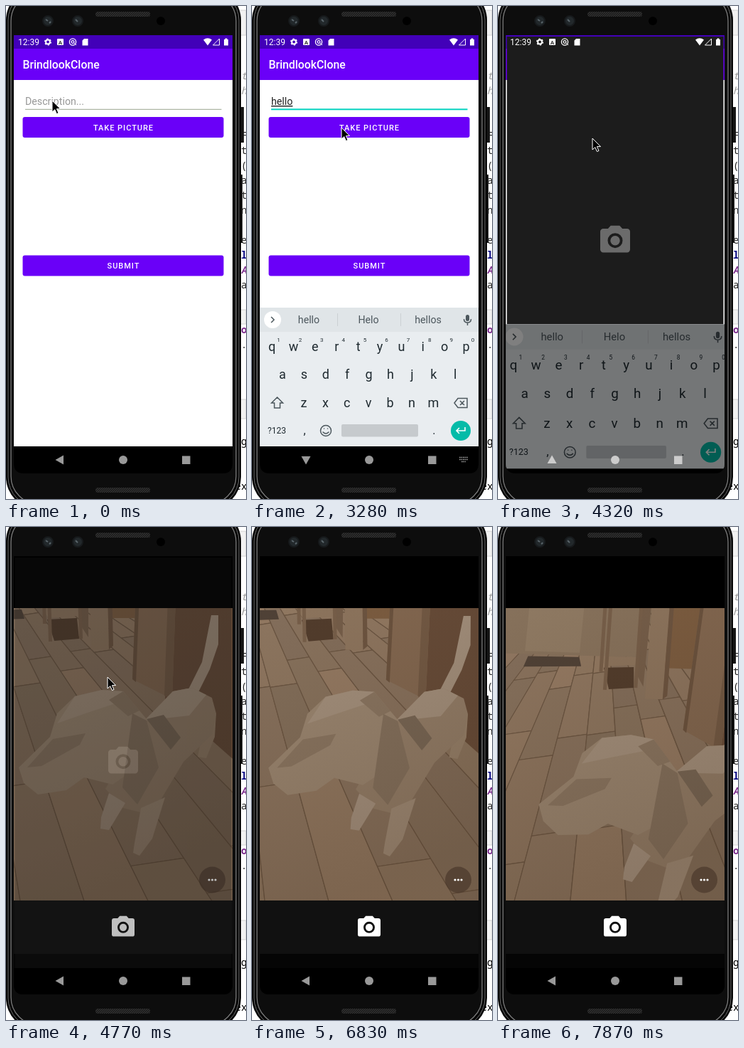
These frames come from a looping animation (338 px wide and 693 px high, 8 s). An HTML page:

```html
<!DOCTYPE html>
<html lang="en">
<head>
<meta charset="utf-8">
<title>Phone demo</title>
<style>
html, body { margin: 0; width: 100%; height: 100%; overflow: hidden; background: #fff; }
svg { display: block; width: 338px; height: 693px; font-family: Roboto, sans-serif; }
.mid { text-anchor: middle; }
.btn { font-size: 11px; font-weight: 500; letter-spacing: .98px; fill: #fff; text-anchor: middle; }
.line { fill: none; stroke: #4c575d; stroke-width: 1.5; }
#code { font: 14px "Noto Sans Mono", monospace; }
</style>
</head>
<body>
<svg viewBox="0 0 338 693">
  <defs>
    <clipPath id="screen"><path d="M11 41H319V643Q319 657 305 657H25Q11 657 11 643Z"/></clipPath>
    <clipPath id="keyClip"><rect id="keyArea" x="11" y="41" width="308" height="578"/></clipPath>
    <clipPath id="lens"><rect x="11" y="114" width="308" height="411"/></clipPath>
    <pattern id="mesh" width="3" height="3" patternUnits="userSpaceOnUse">
      <rect width="3" height="3" fill="#1b1b1b"/><path d="M0 3L3 0" stroke="#3a3a3a"/>
    </pattern>
    <linearGradient id="shade" x2=".3" y2="1">
      <stop offset="0" stop-color="#35210f" stop-opacity="0"/>
      <stop offset="1" stop-color="#35210f" stop-opacity=".22"/>
    </linearGradient>
    <g id="cam">
      <path d="M9 2 7.17 4H4a2 2 0 0 0-2 2v12a2 2 0 0 0 2 2h16a2 2 0 0 0 2-2V6a2 2 0 0 0-2-2h-3.17L15 2zm3 15a5 5 0 1 1 0-10 5 5 0 0 1 0 10z"/>
      <circle cx="12" cy="12" r="3.2"/>
    </g>
  </defs>

  <!-- editor behind the phone -->
  <rect width="338" height="693" fill="#fff"/>
  <path d="M320 6h18v35h-18zM320 427h18v20h-18zM320 553h18v27h-18z" fill="#f2f2f2" stroke="#d4d4d4"/>
  <g id="code"><text x="331" y="617">g</text><text x="322.5" y="680">ex</text></g>

  <!-- phone -->
  <path d="M328 142h7v50h-7zM328 237h5v96h-5z" fill="#161616"/>
  <rect y="-25" width="331" height="732" rx="45" fill="#050505"/>
  <rect x="3" y="-22" width="325" height="726" rx="42" fill="none" stroke="#6a6a6a"/>
  <rect x="7" y="-18" width="317" height="718" rx="39" fill="#0d0d0d" stroke="#7c7c7c" stroke-width="1.3"/>
  <rect x="126" y="8" width="77" height="7" rx="3" fill="url(#mesh)"/>
  <rect x="126" y="677" width="77" height="7" rx="3" fill="url(#mesh)"/>
  <g fill="#22282b" stroke="#171a1c" stroke-width="2">
    <circle cx="59" cy="21" r="7"/><circle cx="101" cy="21" r="7"/>
  </g>
  <path d="M56 19l3 2M61 24l2-2M98 19l3 3" stroke="#59646a" stroke-width="2"/>
  <circle cx="218" cy="21" r="6" fill="#000"/>

  <g clip-path="url(#screen)">
    <rect x="11" y="41" width="308" height="616" fill="#000"/>

    <g id="app">
      <rect x="11" y="41" width="308" height="578" fill="#fff"/>
      <rect x="11" y="41" width="308" height="19" fill="#4200b8"/>
      <rect x="11" y="60" width="308" height="44" fill="#6a00f8"/>
      <text x="23.5" y="88" font-size="15.8" font-weight="500" fill="#fff">BrindlookClone</text>
      <text id="hint" x="27" y="139" font-size="14.2" fill="#989898">Description...</text>
      <text id="typed" x="27" y="139" font-size="14.2" fill="#222" text-decoration="underline"></text>
      <rect id="rule" x="27" width="276.5"/>
      <rect id="caret" y="125" width="1.6" height="18" fill="#03cdb9"/>
      <rect id="take" x="23.5" y="156" width="283" height="29" rx="3"/>
      <text class="btn" x="165.5" y="175">TAKE PICTURE</text>
      <rect x="23.5" y="350.5" width="283" height="29" rx="3" fill="#6a00f8"/>
      <text class="btn" x="165.5" y="369">SUBMIT</text>
    </g>

    <g id="camera">
      <rect x="11" y="41" width="308" height="616" fill="#000"/>
      <rect x="11" y="525" width="308" height="75" fill="#111"/>
      <rect x="11" y="600" width="308" height="20" fill="#050505"/>
      <g clip-path="url(#lens)">
        <g id="floor"></g>
        <g id="room"></g>
        <g id="dog"></g>
        <rect x="11" y="114" width="308" height="411" fill="url(#shade)"/>
      </g>
      <circle cx="290.5" cy="496" r="18.5" fill="#4a382b" fill-opacity=".7"/>
      <path d="M286 496h.01M290.5 496h.01M295 496h.01" stroke="#fff" stroke-width="3.2" stroke-linecap="round"/>
      <use href="#cam" fill="#fff" transform="translate(145.8 543.6) scale(1.6)"/>
    </g>

    <g id="splash">
      <rect x="12.5" y="43" width="305" height="577" fill="#1c1c1c"/>
      <use href="#cam" fill="#6b6b6b" transform="translate(139.8 304.5) scale(2.1)"/>
    </g>

    <g clip-path="url(#keyClip)">
      <g id="keyboard">
        <rect x="11" y="424" width="308" height="195" fill="#e9edf0"/>
        <rect x="11" y="424" width="308" height="34" fill="#e0e5e8"/>
        <circle cx="29" cy="441" r="12" fill="#fff"/>
        <path id="chevron" class="line"/>
        <g id="tools">
          <path class="line" d="M72 443l5 5M74 439.5a4.5 4.5 0 1 1-9 0 4.500 4.500 0 1 1 9 0M110 435h10v8l-4 4h-6zM112 440q3 4 6 0"/>
          <text class="mid" x="159" y="445" font-size="11" font-weight="700" fill="#4c575d">GIF</text>
          <rect x="199" y="435" width="12" height="12" fill="#5b666c"/>
          <path d="M232.5 433v16" stroke="#cbd0d3"/>
          <path d="M255 441h.01M260 441h.01M265 441h.01" stroke="#4c575d" stroke-width="3" stroke-linecap="round"/>
        </g>
        <g id="words" font-size="14.2" fill="#4c575d" class="mid">
          <path d="M120.5 432v18M209.5 432v18" stroke="#cbd0d3"/>
          <text x="80" y="446"></text><text x="164" y="446"></text><text x="248" y="446"></text>
        </g>
        <rect x="301" y="434" width="5" height="9" rx="2.5" fill="#4c575d"/>
        <path class="line" d="M298.5 440q0 5 5 5t5-5M303.5 445v4"/>
        <g id="keys" class="mid" fill="#1f2a30"></g>
        <path class="line" d="M35.5 550l8 8h-4v7h-8v-7h-4zM285 558l5-6.5h13v13h-13zM293 555l6 6M299 555l-6 6"/>
        <circle class="line" cx="104" cy="597" r="7.5"/>
        <path class="line" d="M100 599q4 4 8 0M101.5 594h.01M106.5 594h.01" stroke-linecap="round"/>
        <rect x="126" y="588" width="108" height="17.5" rx="2" fill="#c6cacd"/>
        <circle cx="294" cy="597" r="14" fill="#04bba8"/>
        <path d="M300 592v5h-12M292 593l-4 4 4 4" fill="none" stroke="#fff" stroke-width="1.6"/>
        <rect id="dim" x="11" y="424" width="308" height="195"/>
      </g>
    </g>

    <g id="status" fill="#fff">
      <text x="17" y="55" font-size="12">12:39</text>
      <circle cx="59" cy="50.5" r="2.9" fill="none" stroke="#fff" stroke-width="2"/>
      <circle cx="59" cy="50.5" r="4.3" fill="none" stroke="#fff" stroke-width="1.5" stroke-dasharray="2.25"/>
      <rect x="72" y="46" width="9" height="9" rx="1"/>
      <text class="mid" x="76.5" y="53.5" font-size="8" font-weight="700" fill="#333">A</text>
      <circle cx="94" cy="50.5" r="4.6" fill="none" stroke="#fff" stroke-width="1.3"/>
      <circle cx="94" cy="50.5" r="1.9" fill="none" stroke="#fff" stroke-width="1.2"/>
      <path d="M96 52l3 3" stroke="#fff"/>
      <path d="M110 46h5.5v9.5h-8v-7zM284 55.5l-6-8q6-4.5 12 0zM307 47h1.5v-1.5h3v1.5h1.5v8.5h-6z"/>
      <path d="M300.5 46v9h-9z" fill="none" stroke="#fff"/>
    </g>

    <g id="nav">
      <path id="back" d="M69.5 638l11.5-6.5v13z"/>
      <circle cx="165" cy="638" r="6"/>
      <rect x="248" y="632.5" width="11.5" height="11.5"/>
      <path id="imeIcon" d="M292 634.5h12M292 637.5h12M295 640.5h6" stroke="#999" stroke-width="1.7" stroke-dasharray="1.7 .8"/>
    </g>
  </g>
  <path id="cursor" d="M0 0V16l3.8-3.4 2.6 6 2.6-1.1-2.6-5.9H11.5z" fill="#000" stroke="#fff"/>
</svg>

<script>
const $ = id => document.getElementById(id);
const set = (id, attrs) => { for (const k in attrs) $(id).setAttribute(k, attrs[k]); };
const show = (id, on) => $(id).style.display = on ? "" : "none";
const mix = (a, b, k) => a + (b - a) * k;
const add = (id, html) => $(id).insertAdjacentHTML("beforeend", html);
const poly = (id, fill, points, extra = "") =>
  add(id, `<polygon fill="${fill}" points="${points}" ${extra}/>`);

// Editor text peeking out at the right, one character per line
const ink = c => c === "l" ? "#000080" : /[Ao]/.test(c) ? "#7b2a8c" : "#222";
[..."th  Ft(atn elAa  o."].forEach((c, i) => add("code",
  `<text x="331" y="${103 + 21 * i}" fill="${i < 2 ? "#999" : ink(c)}"
    font-weight="${/[lAo]/.test(c) ? 700 : 400}" font-style="${i < 2 || /A/.test(c) ? "italic" : "normal"}">${c}</text>`));

// Keys
const row = (chars, x, y, size = 18) => [...chars].forEach((c, i) =>
  add("keys", `<text x="${x + 30.4 * i}" y="${y}" font-size="${size}">${c}</text>`));
row("qwertyuiop", 28, 485);
row("1234567890", 37.5, 472, 8);
row("asdfghjkl", 43, 524);
row("zxcvbnm", 73, 564);
row(",     .", 74, 602, 16);
add("keys", '<text x="35" y="601" font-size="12">?123</text>');

// Floor boards fan out from a vanishing point, with slightly tilted joints
const rand = n => { const s = Math.sin(n * 127.1) * 43758.5; return s - Math.floor(s); };
const onRay = (i, d) => {
  const s = i * .165, k = d / (1 + .15 * s);
  return [-70 + s * k, -20 + k].map(v => v.toFixed(1));
};
poly("floor", "#84705a", "-400,-100 700,-100 700,800 -400,800");
for (let i = -11; i < 22; i++) {
  for (let j = 0; j < 6; j++) {
    const near = 75 * 1.55 ** (j + rand(i + 40)), far = near * 1.55, v = rand(i * 9 + j + 200);
    poly("floor", `hsl(29 ${18 + v * 2}% ${43 + v * 5}%)`,
      [onRay(i, near), onRay(i + 1, near), onRay(i + 1, far), onRay(i, far)].join(" "),
      'stroke="#6a5542" stroke-width="1.2"');
  }
}

// Upright slab reaching out of view at the top
const post = (fill, x, w, foot, lean = 0, drop = 0) =>
  poly("room", fill, [x, -40, x + w, -40, x + w + lean, foot + drop, x + lean, foot]);
post("#86715b", -200, 316, 114);
post("#8e7962", -55, 77, 110);
poly("room", "#4f4136", "-50,117 22,116 26,129 -55,132");
post("#7b5c40", 143, 48, 128);
post("#745d49", 103, 13, 135, 0, 20);
poly("room", "#513c2c", "58,130 100,128 103,157 68,160");
post("#8c745d", 115, 25, 172, 5);
post("#6c5440", 140, 6, 172, 5, -5);
poly("room", "#8c745d", "50,114 101,114 104,125 60,128");
for (const [x, foot] of [[46, 136], [54, 161], [97, 157]]) post("#765e49", x, 5, foot, 6);
poly("room", "#664b38", "240,-40 460,-40 460,450 224,242");
post("#826750", 188, 56, 214, -10, 28);
post("#6a523e", 188, 5, 214, -10, 4);
post("#725944", 233, 11, 237, -10, 5);

const fur = (tone, points) => poly("dog", `hsl(30 17% ${tone}%)`, points);
fur(56, "289,124 299,124 299,165 287,200 270,234 256,230 276,190");
fur(50, "284,262 296,262 294,295 282,325 270,323 275,298");
fur(49, "195,272 235,231 262,226 290,240 296,262 290,292 250,330 205,405 165,395 140,368");
fur(56, "195,272 235,231 262,226 282,236 258,265");
fur(54, "190,395 224,380 206,438 188,462 179,458 181,444");
fur(57, "145,374 168,388 145,426 133,424 134,408");
fur(52, "18,338 62,295 72,262 97,238 135,229 165,231 198,270 175,345 150,362 110,352 85,370 45,376 25,360");
fur(56, "97,238 135,229 165,231 172,242 112,262 72,276");
fur(46, "30,338 66,298 112,290 104,306 50,336");
fur(46, "145,243 165,231 188,258 172,266");
fur(44, "178,262 198,272 215,338 185,390 164,366");
fur(40, "198,270 222,264 246,296 232,313");

// Pointer stops: step, x, y
const stops = [[1, 65, 133], [7, 97, 131], [19, 97, 131], [22, 126, 171], [26, 133, 186], [29, 133, 186],
  [32, 143, 211], [34, 143, 211], [37, 143, 242], [41, 121, 244], [54, 121, 244]];
function pointer(n) {
  const i = Math.max(1, stops.findIndex(s => s[0] >= n));
  const [a, x, y] = stops[i - 1], [b, u, v] = stops[i];
  const k = Math.max(0, (n - a) / (b - a));
  return [mix(x, u, k), mix(y, v, k)];
}

const typing = ["", "h", "he", "hell", "hello"];
const guesses = ["", "hi how he", "he hey her", "hell hello help", "hello Helo hellos"];

// Affine move from rest to m; sideways and vertical parts ease differently
const pan = (id, [a, b, c, d, e, f], kx, ky) => set(id, {
  transform: `matrix(${mix(1, a, kx)} ${b * ky} ${c * kx} ${mix(1, d, ky)} ${e * kx} ${f * ky})`
});

function draw(n) {
  const focus = n >= 3, opening = n >= 26, zoomed = n >= 29, live = n >= 31;
  const typed = Math.min(4, Math.max(0, n - 14));

  $("typed").textContent = typing[typed];
  show("hint", !typed);
  set("rule", focus ? { y: 144.3, height: 2, fill: "#06d3c0" } : { y: 144.8, height: 1, fill: "#9aa68f" });
  show("caret", (n >= 10 && n < 13) || (n >= 15 && n < 20));
  set("caret", { x: 27 + (typed ? $("typed").getComputedTextLength() + .5 : 0) });
  set("take", { fill: n === 24 || n === 25 ? "#8a3cfa" : "#6a00f8" });

  show("tools", !typed);
  show("words", typed);
  set("chevron", { d: typed ? "M27 437l4 4-4 4" : "M31 437l-4 4 4 4" });
  const guess = guesses[typed].split(" ");
  document.querySelectorAll("#words text").forEach((el, i) => el.textContent = guess[i] || "");

  const grow = zoomed ? 1 : opening ? .5 : 0;
  const slide = 30 * Math.max(0, 7 - n) ** 2;
  show("keyboard", n >= 5 && !live);
  set("keyArea", { height: opening ? 616 : 578 });
  set("keyboard", { transform: `matrix(${1 + .044 * grow} 0 0 ${1 + .04 * grow} ${-7.3 * grow} ${6.4 * grow + slide})` });
  set("dim", { opacity: .5 * grow });

  show("app", !live);
  show("status", !live);
  show("camera", live);
  set("splash", { opacity: live ? Math.max(0, 33 - n) * .28 : Math.min(1, grow * 1.2) });

  const p = Math.max(0, (n - 44) / 9), kx = p ** 1.35, ky = p ** 3;
  pan("floor", [1, 0, -.43, 1, 211, 68], kx, ky);
  pan("room", [1, .03, -.1, 1, 104, 66], kx, ky);
  pan("dog", [1.067, .138, -.047, 1.042, 54, 35], kx, ky);

  const turn = n < 5 || live ? 0 : zoomed ? 90 : -90;
  set("back", { transform: `rotate(${turn} 76 638)` });
  set("nav", { fill: zoomed && !live ? "#ccc" : "#999" });
  show("imeIcon", n >= 5 && !opening);

  set("cursor", { transform: `translate(${pointer(n)})` });
  show("cursor", n < 43);
}

const start = performance.now();
function tick() {
  const t = (performance.now() - start) % 8000;
  draw(Math.floor((t + 10) / 148.6));
  requestAnimationFrame(tick);
}
tick();
</script>
</body>
</html>
```
